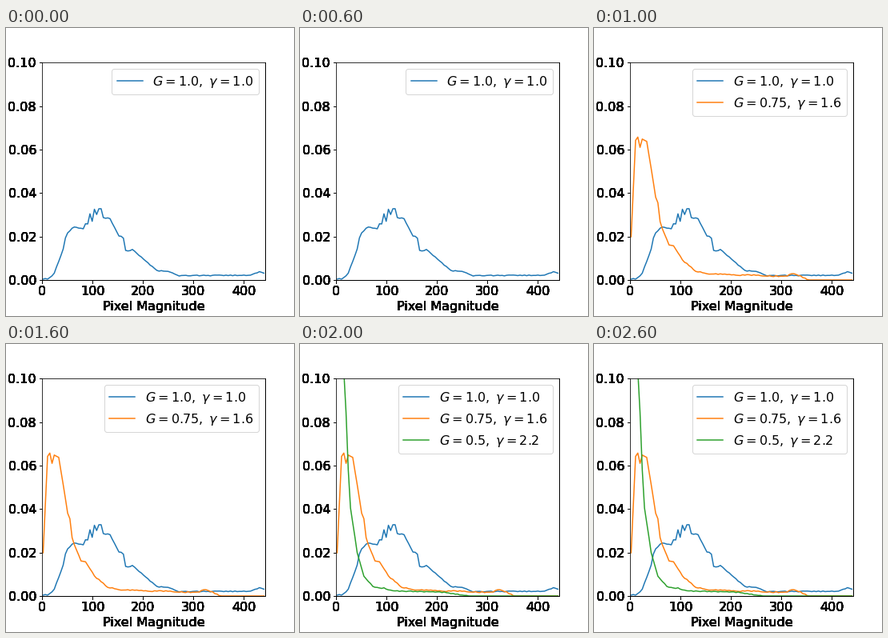
A matplotlib script that plays this animation: 360x360 px, repeating every 3 s.

```python
import matplotlib.pyplot as plt
import numpy as np
from matplotlib.animation import FuncAnimation

plt.rcParams.update({"font.family": "DejaVu Sans", "font.size": 16})

BINS = 100
LAYERS = 12  # stacked copies thicken the text outside the plot area
bins = np.arange(BINS)
x = (bins + 0.5) * 255 * np.sqrt(3) / BINS


def density(points, jitter, seed):
    """Histogram outline through (magnitude, percent) points, lightly jittered."""
    px, py = np.transpose(points)
    y = np.interp(x, px, py) / 100
    noise = np.random.default_rng(seed).uniform(-jitter, jitter, BINS)
    return np.where(y > 0, np.maximum(y + noise, 0), 0)


linear = density(
    [(2, .04), (14, .06), (24, .3), (41, 1.34), (48, 2.1), (63, 2.45),
     (81, 2.36), (95, 2.85), (117, 3.3), (121.5, 2.87), (135, 2.82),
     (152, 2.02), (161, 1.97), (166, 1.31), (179, 1.4), (228, .42),
     (245, .42), (272, .2), (410, .22), (432, .39), (440, .3)], 2e-4, 1)
# Sawtooth on the way up to the peak
linear -= 0.0024 * (-1.0) ** bins * np.exp(-((bins - 22) / 2.5) ** 2)

darker = density(
    [(2, 1.9), (11, 6.4), (15.5, 6.6), (20, 6.08), (24.3, 6.47), (33, 6.42),
     (51, 3.8), (55, 3.6), (60, 2.6), (77, 1.6), (86, 1.6), (104, .9),
     (130, .42), (150, .28), (310, .17), (323, .3), (345, .1), (352, 0)],
    3e-4, 2)

darkest = density(
    [(2, 26), (15.5, 10.3), (20, 8.4), (24.3, 5.8), (28.7, 4.05), (33, 3.4),
     (42, 2), (55, .92), (64, .66), (75, .4), (95, .36), (110, .24),
     (215, .17), (250, .04), (270, 0)], 2e-4, 3)

CURVES = [
    (linear, r"$G=1.0,\ \gamma=1.0$"),
    (darker, r"$G=0.75,\ \gamma=1.6$"),
    (darkest, r"$G=0.5,\ \gamma=2.2$"),
]

fig = plt.figure(figsize=(5, 5), dpi=72, facecolor="white")


def make_axes():
    ax = fig.add_axes([0.125, 0.125, 0.775, 0.755])
    ax.set(xlim=(0, 442), ylim=(0, 0.1), xlabel="Pixel Magnitude")
    ax.set_xticks(range(0, 401, 100))
    ax.set_yticks(np.linspace(0, 0.1, 6))
    ax.yaxis.set_major_formatter("{x:.2f}")
    return ax


ax = [make_axes() for _ in range(LAYERS)][-1]
lines = [ax.plot(x, y, lw=1.5, label=label)[0] for y, label in CURVES]


def draw(step):
    for i, line in enumerate(lines):
        line.set_visible(i <= step)
    ax.legend(handles=lines[:step + 1], loc="upper right")
    return lines


anim = FuncAnimation(fig, draw, frames=3, interval=1000, repeat=True,
                     repeat_delay=0, blit=False)
plt.show()
```
